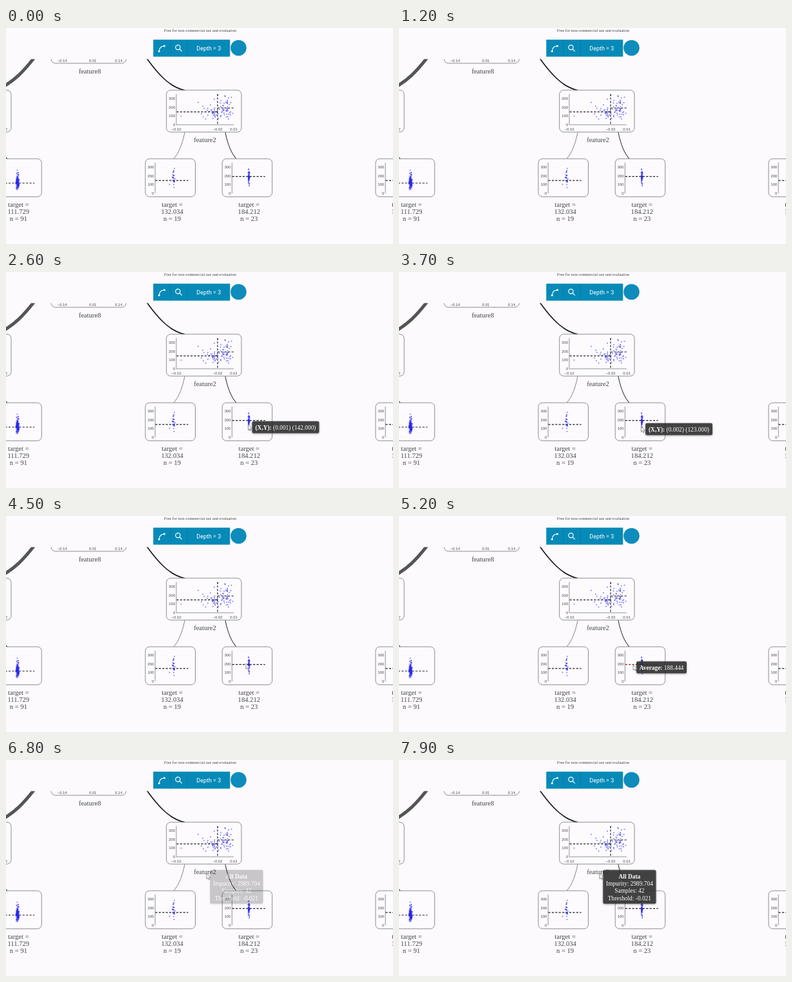
These frames come from a looping animation (600 by 337 pixels, 8 s). An HTML page:

```html
<!DOCTYPE html>
<html lang="en">
<head>
<meta charset="utf-8">
<title>Decision tree viewer</title>
<style>
  html, body { margin: 0; height: 100%; overflow: hidden; background: #fcfafd; }
  svg { display: block; width: 100vw; height: 100vh; }
  text { font-family: "Liberation Serif", "Times New Roman", serif; font-size: 10.6px; fill: #444; text-anchor: middle; }
  .tick { font-family: "Liberation Sans", Arial, sans-serif; font-size: 5.9px; }
  .card { fill: #fdfbfe; stroke: #808080; stroke-width: .9; }
  .axis { stroke: #777; stroke-width: .8; fill: none; }
  .mean { stroke: #1c1c1c; stroke-width: 1.15; stroke-dasharray: 3.2 2.2; fill: none; }
  .link { fill: none; stroke: #1a1a1a; }
  .dot { fill: #2a2aea; fill-opacity: .55; }
  .tip rect { fill: #323232; fill-opacity: .87; filter: drop-shadow(0 1px 1.5px #0006); }
  .tip text { font-size: 9.4px; fill: #fff; }
  .icon { fill: none; stroke: #fff; stroke-width: 1.2; stroke-linecap: round; }
</style>
</head>
<body>
<svg id="stage" viewBox="0 0 600 337">
  <defs><clipPath id="view"><rect y="48.5" width="600" height="289"/></clipPath></defs>
  <g id="tree" clip-path="url(#view)"></g>
  <text x="301" y="6" style="font-size:6.33px">Free for non-commercial use and evaluation</text>
  <rect x="228.3" y="18.2" width="119" height="26.5" fill="#078ab8"/>
  <path d="M255 18.2V44.7M281.3 18.2V44.7" stroke="#087aa5" stroke-width=".8"/>
  <path class="icon" d="M237.5 35.5C238 31 241 28.5 245 28.2"/>
  <circle cx="237.4" cy="36.2" r="1.5" fill="#fff"/>
  <circle cx="245.6" cy="28" r="1.5" fill="#fff"/>
  <circle class="icon" cx="266.5" cy="30.2" r="3.6"/>
  <path class="icon" d="M269.3 33L272.4 36.2"/>
  <text x="314.3" y="35" style="font:9px Roboto, 'Open Sans', sans-serif;fill:#fff">Depth = 3</text>
  <circle cx="360.5" cy="31" r="12.3" fill="#0f8cbb"/>
  <g id="tips"></g>
  <path id="cursor" d="M0 0V8.7L2 6.9L3.4 9.9L4.8 9.3L3.4 6.4H6.2Z" fill="#fff" stroke="#777" stroke-width=".8" stroke-linejoin="round"/>
</svg>
<script>
const LOOP = 8000;
const tree = document.getElementById('tree');
const tipLayer = document.getElementById('tips');
const cursor = document.getElementById('cursor');

function add(parent, tag, attrs, text = '') {
  const node = document.createElementNS('http://www.w3.org/2000/svg', tag);
  for (const name in attrs) node.setAttribute(name, attrs[name]);
  node.textContent = text;
  parent.appendChild(node);
  return node;
}

const path = (cls, d, extra = {}) => add(tree, 'path', { class: cls, d, ...extra });
const label = (x, y, text) => add(tree, 'text', { x, y }, text);
const tick = (x, y, text, anchor = 'middle') =>
  add(tree, 'text', { x, y, class: 'tick', style: `text-anchor:${anchor}` }, text);
const dot = (cx, cy) => add(tree, 'circle', { class: 'dot', cx, cy, r: 1.05 });
const card = (x, y, width, height) => add(tree, 'rect', { class: 'card', x, y, width, height, rx: 6.5 });

let seed = 7;
function random() {
  seed = (seed * 16807) % 2147483647;
  return seed / 2147483647;
}
const bell = () => (random() + random() + random()) / 1.5 - 1;

function cloud(count, x, y, spreadX, spreadY) {
  for (let i = 0; i < count; i++) dot(x + bell() * spreadX, y + bell() * spreadY);
}

function yAxis(x, top) {
  path('axis', `M${x} ${top}v48`);
  ['300', '200', '100', '0'].forEach((text, i) => tick(x - 1.8, top + 9 + i * 13.6, text, 'end'));
}

function leaf(x, meanY, target, n) {
  card(x, 204, 77.5, 59.3);
  yAxis(x + 15.2, 210);
  const meanLine = path('mean', `M${x + 15.5} ${meanY}h51`);
  ['target =', target, n].forEach((text, i) => label(x + 41.6, 278.8 + i * 11.3, text));
  return meanLine;
}

// Links
path('link', 'M43.2 47C26.2 69 13.5 81 -4 91.5', { 'stroke-width': 5, style: 'stroke:#555' });
path('link', 'M218 47C234 69.5 253 92.5 277 97', { 'stroke-width': 1.7 });
path('link', 'M277 163C274 178 269 194 260 204', { 'stroke-width': .9, style: 'stroke:#777' });
path('link', 'M340 163C343 178 348 194 357 204', { 'stroke-width': 1.1, style: 'stroke:#333' });
path('link', 'M-3 199L2 204', { 'stroke-width': 1.3, style: 'stroke:#555' });

// Upper nodes
card(70, -11, 116.3, 66);
tick(87, 52.6, '−0.14');
tick(134.5, 52.6, '0.01');
tick(174.5, 52.6, '0.14');
label(130, 71, 'feature8');
card(-109, 97, 117, 65.3);
tick(2, 160, '0.02', 'end');

// Split on feature2
card(248.7, 97, 116.3, 65.3);
yAxis(264, 103);
path('axis', 'M264 151H353');
tick(264, 160, '−0.10');
tick(328, 160, '−0.02');
tick(353, 160, '0.01');
label(308.5, 177.5, 'feature2');
[[271.5, 137.5], [298, 116], [305, 122], [307, 125.5], [303, 134], [306, 138.5], [312, 128.5],
 [313, 136], [309.5, 142], [317, 120], [323, 111], [321, 141], [349.5, 108], [345, 109]]
  .forEach(([x, y]) => dot(x, y));
cloud(24, 323, 132, 13, 15);
cloud(46, 340, 124, 14, 22);
path('mean', 'M264.5 130.8H328M328 124.7H353M328 103V151');

// Leaves
leaf(-22.3, 242, '111.729', 'n = 91');
leaf(216, 237.8, '132.034', 'n = 19');
leaf(573, 237.8, '184.000', 'n = 20');
const hoverLine = leaf(335.2, 231.6, '184.212', 'n = 23');
cloud(110, 18, 242.5, 3.4, 12);
cloud(45, 18, 235, 2.8, 17);
cloud(24, 260, 234, 2.6, 17);
dot(261, 219);
dot(253.5, 244);
cloud(62, 376.5, 231.5, 1.9, 18);

// Tooltips: a row is [bold part, plain part]; each fades in at `from` and out at `to`
const tips = [
  { x: 381.5, y: 232.8, w: 104, from: 2350, to: 3200, rows: [['(X,Y):', ' (0.001) (142.000)']] },
  { x: 382, y: 235.8, w: 104, from: 3350, to: 4150, rows: [['(X,Y):', ' (0.002) (123.000)']] },
  { x: 368, y: 226.8, w: 78, from: 4850, to: 6100, rows: [['Average:', ' 188.444']] },
  { x: 316.3, y: 171.5, w: 82.2, from: 6740, to: LOOP + 300, rows: [['All Data', ''],
    ['', 'Impurity: 2989.704'], ['', 'Samples: 42'], ['', 'Threshold: -0.021']] }
];
for (const tip of tips) {
  tip.node = add(tipLayer, 'g', { class: 'tip' });
  add(tip.node, 'rect', { x: tip.x, y: tip.y, width: tip.w, height: 7.5 + 11.3 * tip.rows.length, rx: 2.5 });
  tip.rows.forEach(([bold, plain], i) => {
    const line = add(tip.node, 'text', { x: tip.x + tip.w / 2, y: tip.y + 13.2 + i * 11.3 });
    add(line, 'tspan', { 'font-weight': 'bold' }, bold);
    add(line, 'tspan', {}, plain);
  });
}

// Pointer stops: time, x, y
const stops = [
  [1200, 452, 338], [1700, 399, 272], [2000, 387, 244.5], [2350, 375.5, 238], [3200, 375.5, 238],
  [3400, 375.5, 241], [4150, 375.5, 241], [4500, 372, 230], [4850, 363, 232], [6100, 363, 232],
  [6700, 311, 177], [LOOP, 311, 177]
];
const clamp = v => Math.max(0, Math.min(1, v));

function draw(t) {
  const visible = t >= stops[0][0];
  cursor.setAttribute('visibility', visible ? 'visible' : 'hidden');
  if (visible) {
    const next = stops.findIndex(stop => stop[0] > t);
    const [t0, x0, y0] = stops[next - 1], [t1, x1, y1] = stops[next];
    const k = (t - t0) / (t1 - t0);
    const eased = k * (3 - k) / 2;
    cursor.setAttribute('transform', `translate(${x0 + (x1 - x0) * eased} ${y0 + (y1 - y0) * eased})`);
  }
  for (const tip of tips) {
    tip.node.setAttribute('opacity', Math.min(clamp((t - tip.from) / 220), clamp(1 - (t - tip.to) / 220)));
  }
  hoverLine.style.stroke = t >= 4850 && t < 6100 ? '#8f2020' : '';
}

const start = performance.now();
(function frame() {
  draw((performance.now() - start) % LOOP);
  requestAnimationFrame(frame);
})();
</script>
</body>
</html>
```
